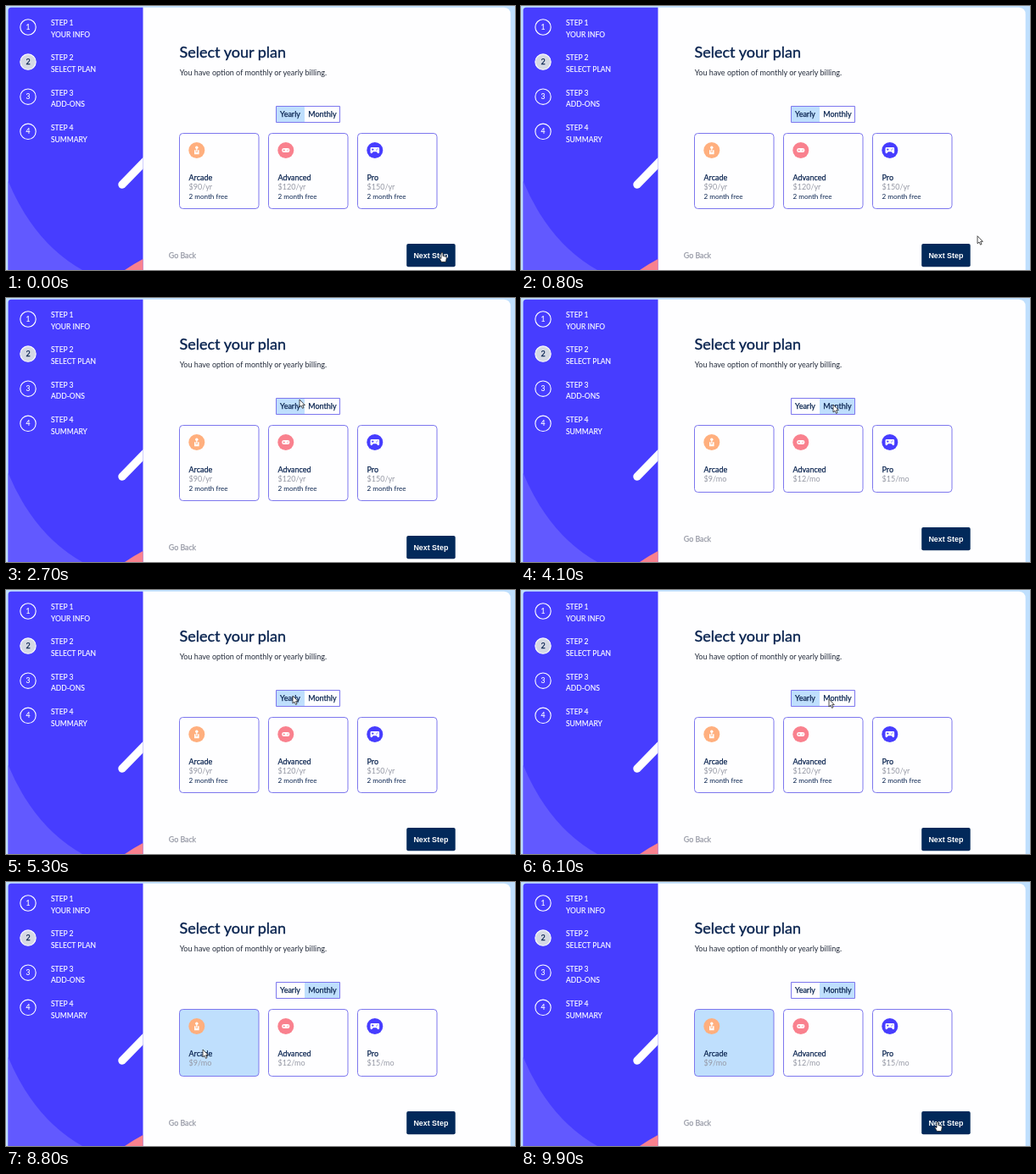
An HTML page that plays this animation: 600 by 312 pixels, repeating every 10 s.

```html
<!DOCTYPE html>
<html lang="en">
<head>
<meta charset="utf-8">
<title>Select your plan</title>
<style>
  html, body { margin: 0; width: 100%; height: 100%; overflow: hidden; background: #bfdffd; }
  svg { display: block; width: 600px; height: 312px; }
  text { font: 9px Lato, "Open Sans", sans-serif; fill: #0a2450; }
  .medium { stroke: #0a2450; stroke-width: .25; }
  .step { font-size: 8.5px; fill: #fff; stroke: #fff; stroke-width: .15; }
  .gray { fill: #9699a5; }
  .box { fill: #fefeff; stroke: #7d77ee; }
  .on { fill: #bfdffd; }
</style>
</head>
<body>
<svg viewBox="0 0 600 312">
  <path fill="#fefeff" d="M161 1.7H587Q594.7 2 594.7 10V312H161Z"/>
  <path fill="#473dff" d="M2.6 312V5Q3 1.7 6 1.7H161.5V312Z"/>
  <path fill="#6259ff" d="M2.6 207Q33 280 90 312H2.6Z"/>
  <path fill="#f9818e" d="M140 312Q151 304.5 161.5 299V312Z"/>
  <clipPath id="side"><path d="M3 2H161.5V312H3Z"/></clipPath>
  <path clip-path="url(#side)" d="M137 211L170 177" stroke="#fff" stroke-width="9.5" stroke-linecap="round"/>
  <g id="steps"></g>

  <text class="medium" x="204.5" y="61.3" style="font-size:18px;stroke-width:.4">Select your plan</text>
  <text x="204.7" y="81.7" style="font-size:9.05px;fill:#222a3a">You have option of monthly or yearly billing.</text>

  <path class="box" d="M318.5 118.5H393.5V137.5H318.5Z"/>
  <path id="pick" class="on"/>
  <text class="medium" x="323" y="131.3">Yearly</text>
  <text class="medium" x="356.3" y="131.3">Monthly</text>
  <g id="cards"></g>

  <g id="footer">
    <text class="gray" x="191.8" y="298" style="font-size:8.8px;stroke:#9699a5;stroke-width:.25">Go Back</text>
    <rect x="472.2" y="281" width="57.5" height="27.2" rx="2" fill="#02295a"/>
    <text x="480.4" y="297.7" style="font:bold 8.9px 'Liberation Sans',Arial,sans-serif;fill:#fff">Next Step</text>
  </g>

  <g id="cursor" fill="#fff" stroke="#222" stroke-width=".8" stroke-linejoin="round">
    <path id="arrow" d="M0 0V9L2 7.2L3.5 10.4L5 9.7L3.6 6.6H6.3Z"/>
    <path id="hand" d="M-1 1Q0-.6 1 1V4.5L4.5 5.3Q5.5 5.7 5.3 7L4.4 11.5H-.6L-3 7.6Q-3.2 6.2-1 7.4Z"/>
  </g>
</svg>
<script>
const $ = id => document.getElementById(id);

$("steps").innerHTML = ["YOUR INFO", "SELECT PLAN", "ADD-ONS", "SUMMARY"].map((name, i) => {
  const y = 25 + i * 41.1, active = i === 1;
  return `<circle cx="26" cy="${y}" r="9.2" fill="${active ? "#d5d9e4" : "none"}" stroke="#fff" stroke-width="1.1"/>
    <text class="${active ? "medium" : "step"}" x="26" y="${y + 3.1}" text-anchor="middle">${i + 1}</text>
    <text class="step" x="53" y="${y - 1.7}">STEP ${i + 1}</text>
    <text class="step" x="53" y="${y + 12.2}">${name}</text>`;
}).join("");

const plans = [
  { name: "Arcade", price: 9, color: "#ffaf7e",
    icon: `<circle cy="-3.3" r="1.7"/><path d="M-.6-2H.6V1.5H-.6ZM-2.8-.2H-1.3V2.2H1.3V-.2H2.8V4.8H-2.8Z"/>` },
  { name: "Advanced", price: 12, color: "#f9818e",
    icon: `<rect x="-4.6" y="-2.6" width="9.2" height="5.2" rx="2.4"/>
      <path d="M-3.2 0H-1M-2.1-1.1V1.1M1.2.5H2.1M2.4-.5H3.3" stroke="#f9818e" stroke-width=".8"/>` },
  { name: "Pro", price: 15, color: "#473dff",
    icon: `<path d="M-4.4-3.5H4.4Q5.3-3.5 5.3-2V2.5Q4.2 5.2 2 1.8H-2Q-4.2 5.2-5.3 2.5V-2Q-5.3-3.5-4.4-3.5Z"/>
      <path d="M-3.7-.9H-1.3M-2.5-2.1V.3M1.4-.4H2.4M2.8-1.5H3.8" stroke="#473dff" stroke-width=".9"/>` }
];
$("cards").innerHTML = plans.map((p, i) => `<g transform="translate(${204.5 + i * 105} 150.5)">
    <rect class="box" width="93.5" height="89" rx="4"/>
    <circle cx="20.3" cy="20" r="9.5" fill="${p.color}"/>
    <g transform="translate(20.3 20)" fill="#fff">${p.icon}</g>
    <text class="medium" x="11" y="55.4">${p.name}</text>
    <text class="price gray" x="11" y="66.8"></text>
    <text class="free" x="11" y="77.2" style="font-size:8.1px">2 month free</text>
  </g>`).join("");
const all = selector => [...$("cards").querySelectorAll(selector)];
const boxes = all(".box"), prices = all(".price"), frees = all(".free");

// Cursor stops: time, x, y
const path = [
  [0, 514, 291], [300, 514, 291], [1000, 544, 267], [1900, 544, 267], [2700, 346, 120],
  [2900, 346, 120], [3500, 368, 126], [4400, 368, 126], [4900, 338, 125], [5700, 338, 125],
  [6100, 363, 129], [6300, 371, 124], [7000, 371, 124], [7300, 432, 193], [7500, 433, 195],
  [8200, 433, 195], [8600, 232, 198], [9000, 232, 198], [9900, 491, 283], [10000, 491, 283]
];

function cursorAt(t) {
  const i = path.findIndex(stop => stop[0] > t);
  const [t0, x0, y0] = path[i - 1], [t1, x1, y1] = path[i];
  const u = (t - t0) / (t1 - t0), e = u * u * (3 - 2 * u);
  return [x0 + (x1 - x0) * e, y0 + (y1 - y0) * e];
}

function draw(now) {
  const t = Math.floor(now % 10000 / 100) * 100;
  const monthly = t >= 3800 && t < 5300 || t >= 6600;
  const chosen = t >= 8800 ? 0 : t >= 8100 ? 2 : -1;
  const lift = monthly ? -10 : 0;

  $("pick").setAttribute("d", monthly ? "M352 119H393V137H352Z" : "M319 119H352V137H319Z");
  $("footer").setAttribute("transform", `translate(0 ${lift})`);
  plans.forEach((p, i) => {
    boxes[i].setAttribute("height", 89 + lift);
    boxes[i].classList.toggle("on", i === chosen);
    prices[i].textContent = monthly ? `$${p.price}/mo` : `$${p.price * 10}/yr`;
    frees[i].style.display = monthly ? "none" : "";
  });

  const [x, y] = cursorAt(t);
  const over = x > 472 && x < 530 && y > 281 + lift && y < 308 + lift;
  $("cursor").setAttribute("transform", `translate(${x} ${y})`);
  $("arrow").style.display = over ? "none" : "";
  $("hand").style.display = over ? "" : "none";
  requestAnimationFrame(draw);
}
requestAnimationFrame(draw);
</script>
</body>
</html>
```
